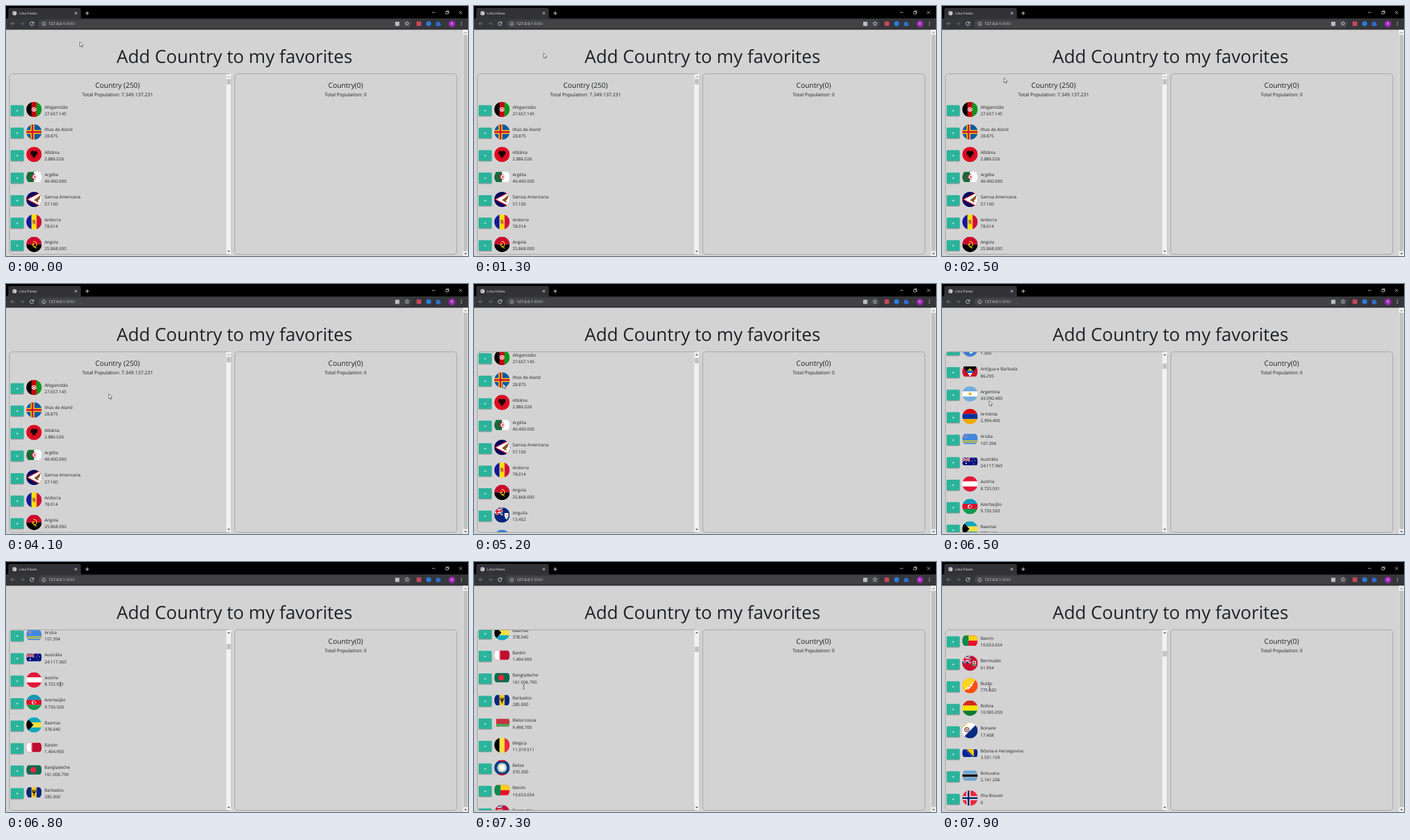
Recreate the animation shown at these times as an HTML page. Size 704x382 px, loop 8000 ms.

```html
<!DOCTYPE html>
<html lang="pt">
<head>
<meta charset="utf-8">
<title>Lista Países</title>
<style>
html, body { margin: 0; width: 100%; height: 100%; overflow: hidden; background: #d3d3d3; }
svg { display: block; width: 100%; height: 100%; }
text { font-family: "Open Sans", "Noto Sans", sans-serif; fill: #1f2124; text-rendering: geometricPrecision; white-space: pre; }
.mid { text-anchor: middle; }
</style>
</head>
<body>
<svg id="stage" viewBox="0 0 704 382" preserveAspectRatio="none"></svg>
<script>
const rect = (x, y, w, h, fill, rx = 0) => `<rect x="${x}" y="${y}" width="${w}" height="${h}" fill="${fill}" rx="${rx}"/>`;
const disc = (x, y, r, fill) => `<circle cx="${x}" cy="${y}" r="${r}" fill="${fill}"/>`;
const ring = (x, y, r, color, w) => `<circle cx="${x}" cy="${y}" r="${r}" fill="none" stroke="${color}" stroke-width="${w}"/>`;
const shape = (d, fill) => `<path d="${d}" fill="${fill}"/>`;
const line = (d, color, w = 1) => `<path d="${d}" fill="none" stroke="${color}" stroke-width="${w}"/>`;
const label = (x, y, size, str, extra = '') => `<text x="${x}" y="${y}" font-size="${size}" ${extra}>${str}</text>`;

function star(x, y, r, fill) {
  let d = '';
  for (let i = 0; i < 10; i++) {
    const a = i * Math.PI / 5, q = i % 2 ? r * .42 : r;
    d += `${i ? 'L' : 'M'}${(x + q * Math.sin(a)).toFixed(2)} ${(y - q * Math.cos(a)).toFixed(2)}`;
  }
  return shape(d + 'Z', fill);
}

// Flags live in a 24 x 24 box clipped to a circle; wide ones fill only a band.
const bars = (...c) => c.map((f, i) => rect(i * 24 / c.length, 0, 24 / c.length + .1, 24, f)).join('');
const bands = (...c) => c.map((f, i) => rect(0, i * 24 / c.length, 24, 24 / c.length + .05, f)).join('');
const band = (h, f) => rect(0, 12 - h / 2, 24, h, f);
const cross = (x, w, f) => rect(x - w / 2, 0, w, 24, f) + rect(0, 12 - w / 2, 24, w, f);
function jack(x, y, w, h) {
  const diag = `M${x} ${y}l${w} ${h}M${x + w} ${y}l${-w} ${h}`;
  const plus = `M${x + w / 2} ${y}v${h}M${x} ${y + h / 2}h${w}`;
  return rect(x, y, w, h, '#00247d') + line(diag, '#fff', h * .2) + line(diag, '#cf142b', h * .08)
    + line(plus, '#fff', h * .32) + line(plus, '#cf142b', h * .18);
}
const crescent = (x, y, r, fill, bg) => disc(x, y, r, fill) + disc(x + r * .3, y, r * .8, bg);

const countries = [
  ['Afeganistão', '27.657.145', bars('#000', '#c4000d', '#009a1c') + ring(12, 12, 3, '#fff', 1.1) + rect(10.7, 10.8, 2.6, 2.6, '#fff')],
  ['Ilhas de Aland', '28.875', rect(0, 0, 24, 24, '#0a58a6') + cross(9.6, 6, '#ffce00') + cross(9.6, 2.8, '#d21034')],
  ['Albânia', '2.886.026', rect(0, 0, 24, 24, '#dc0d22') + shape('M12 8L10 5.5 8.8 7 6.5 7.2 7 13 9.8 12.5 8.5 16 10.7 15.3 12 18.5 13.3 15.3 15.5 16 14.2 12.5 17 13 17.5 7.2 15.2 7 14 5.5Z', '#140306')],
  ['Argélia', '40.400.000', band(16, '#fff') + rect(0, 4, 12, 16, '#146b37') + crescent(11.8, 12, 4, '#d21034', '#e8ece8') + star(13.2, 12, 2, '#d21034')],
  ['Samoa Americana', '57.100', rect(0, 0, 24, 24, '#00065f') + shape('M0 12L24-1V25Z', '#bd1021') + shape('M2.5 12L24 1V23Z', '#fff') + shape('M12 13L17 9 22 5 21 11 18 14 20 17 15 15Z', '#8a5423')],
  ['Andorra', '78.014', bars('#1018a8', '#fedf00', '#d0103a') + rect(9.4, 8.5, 5.2, 7, '#c69a3c', 1.5) + rect(10.4, 9.5, 1.5, 2, '#d0103a') + rect(12, 12, 1.5, 2, '#d0103a')],
  ['Angola', '25.868.000', bands('#cc092f', '#000') + line('M11 7.5C18 7 18 16 11 16M8.5 12L16 18', '#ffcb00', 1.2) + star(11, 11.3, 2, '#ffcb00')],
  ['Anguila', '13.452', rect(0, 0, 24, 24, '#07267d') + jack(-5, 0, 18, 12) + shape('M16 9H22V14Q21 18 19 19 17 18 16 14Z', '#fff') + line('M17.5 12.5h3', '#f08b1d', 1.3) + rect(17, 15, 4, 1.5, '#78bdd4')],
  ['Antárctida', '1.000', rect(0, 0, 24, 24, '#3c7ed0') + shape('M5 6L7 9 9 6 14 5 18 7 20 12 19 16 15 18 13 20 11 17 7 16 6 12 4 9Z', '#fff')],
  ['Antígua e Barbuda', '86.295', band(16, '#ce1126') + shape('M1 4H23L12 20Z', '#000') + star(12, 10.5, 4.6, '#fcd116') + shape('M5.5 10.5H18.5L15.8 14.5H8.2Z', '#0072c6') + shape('M8.2 14.5H15.8L12 20Z', '#fff')],
  ['Argentina', '43.590.400', bands('#74acdf', '#fff', '#74acdf') + disc(12, 12, 2.3, '#f6b40e')],
  ['Arménia', '2.994.400', bands('#d90012', '#0033a0', '#f2a800')],
  ['Aruba', '107.394', band(16, '#4189dd') + rect(0, 14.3, 24, 1.2, '#f9d616') + rect(0, 16.7, 24, 1.2, '#f9d616') + star(5.5, 7.8, 2.6, '#fff') + star(5.5, 7.8, 1.9, '#d21034')],
  ['Austrália', '24.117.360', band(12, '#06107c') + jack(0, 6, 12, 6) + star(6, 15, 1.7, '#fff') + [[18, 8], [15.6, 11.5], [20.3, 10.8], [18, 16]].map(p => star(...p, 1, '#fff')).join('')],
  ['áustria', '8.725.931', bands('#e4173a', '#fff', '#e4173a')],
  ['Azerbaijão', '9.730.500', bands('#1199b8', '#dc102e', '#0f9a4c') + crescent(11.4, 12, 2.9, '#fff', '#dc102e') + star(14.2, 12, 1.5, '#fff')],
  ['Baamas', '378.040', bands('#12a8be', '#fae042', '#12a8be') + shape('M0 0L11 12 0 24Z', '#000')],
  ['Barém', '1.404.900', band(14.4, '#c20b2d') + shape('M0 4.8H7l3 1.44-3 1.44 3 1.44-3 1.44 3 1.44-3 1.44 3 1.44-3 1.44 3 1.44-3 1.44H0Z', '#fff')],
  ['Bangladeche', '161.006.790', band(14.4, '#046a4e') + disc(10.8, 12, 4.7, '#e52a3f')],
  ['Barbados', '285.000', bars('#00267f', '#ffc726', '#00267f') + line('M12 17V8M9.4 8.2Q9.6 13 12 13 14.4 13 14.6 8.2', '#000', 1.2), 16],
  ['Bielorrússia', '9.498.700', band(12, '#c8313e') + rect(0, 14, 24, 4, '#4aa657') + rect(0, 6, 2.8, 12, '#f0d8d8')],
  ['Bélgica', '11.319.511', bars('#000', '#fae042', '#ed2939')],
  ['Belize', '370.300', rect(0, 0, 24, 24, '#003f87') + rect(0, 0, 24, 2.4, '#ce1126') + rect(0, 21.6, 24, 2.4, '#ce1126') + disc(12, 12, 7.5, '#fff') + ring(12, 12, 6, '#5a8a3c', 1)],
  ['Benim', '10.653.654', band(16, '#e8112d') + rect(0, 4, 24, 8, '#fcd116') + rect(0, 4, 9.6, 16, '#08894f')],
  ['Bermudas', '61.954', rect(0, 0, 24, 24, '#c8102e') + jack(-5, 0, 18, 12) + rect(16, 8.5, 5.5, 7.5, '#e9e4e4', 1) + rect(16.5, 13, 4.5, 2.5, '#37883c') + disc(18.7, 11, 1.6, '#b33')],
  ['Butão', '775.620', rect(0, 0, 24, 24, '#ff4e12') + shape('M0 0H24L0 24Z', '#ffd520') + line('M6 18Q7 14 10 15 12 16 13 12 14 8 18 7M8.5 17.5L11 15M13 12L16 11.5', '#fff', 1.8)],
  ['Bolívia', '10.985.059', bands('#d52b1e', '#f9e300', '#0a7a32')],
  ['Bonaire', '17.408', rect(0, 0, 24, 24, '#fff') + shape('M24 0V24H0Z', '#072b7d') + shape('M0 0H9L0 9Z', '#f9d90f') + ring(7, 10.5, 3.5, '#111', 1) + star(7, 10.5, 2.4, '#dc171d')],
  ['Bósnia e Herzegovina', '3.531.159', band(12, '#002395') + shape('M6.5 6H18V17.5Z', '#fecb00') + [0, 1, 2, 3, 4].map(i => star(4.8 + i * 2.6, 7 + i * 2.6, .9, '#fff')).join('')],
  ['Botsuana', '2.141.206', band(16, '#6da5d3') + rect(0, 9.3, 24, 5.4, '#fff') + rect(0, 10, 24, 4, '#000')],
  ['Ilha Bouvet', '0', rect(0, 0, 24, 24, '#e92a3c') + cross(9.6, 6, '#fff') + cross(9.6, 3, '#002868')],
];

const ROW = 34.37;
const row = ([name, people, flag, height = 24], i) => `<g transform="translate(0 ${i * ROW - .4})">
  ${rect(7, 152.8, 20.3, 16.8, 'rgba(0,0,0,.15)', 1.6)}${rect(7.2, 152.6, 20, 16.2, 'rgba(0,0,0,.18)', 1.5)}
  ${rect(7, 151.9, 20, 16.2, '#2bb39b', 1.2)}${line('M15.6 160.3h2.8M17 158.9v2.8', '#fff', .7)}
  <g transform="translate(31 146.8) scale(.975)" clip-path="url(#round)"><g ${height < 24 ? 'clip-path="url(#wide)"' : ''}>${flag}</g></g>
  ${label(58.7, 157.2, 6.5, name)}${label(58.7, 167.5, 6.5, people)}</g>`;

const arrow = (x, y, up, color) => shape(`M${x - 2} ${y + (up ? 1 : -1)}h4l-2 ${up ? -2.3 : 2.3}Z`, color);

const browser = rect(0, 0, 704, 19.5, '#000') + shape('M1 19.5Q3.5 19 3.5 16V6Q3.5 3 6.5 3H111Q114 3 114 6V16Q114 19 116.5 19.5Z', '#323236')
  + rect(0, 19, 704, 17.3, '#35363a') + rect(49, 21, 569, 12.6, '#434346', 6.3)
  + disc(13, 11, 3.2, '#d5d7da') + line('M10.5 10l2 1 .5 2M13 8.3l1.7 1.2', '#55585c', .9)
  + label(20, 12.8, 5.1, 'Lista Países', 'style="fill:#f0f1f3"')
  + line('M104.6 9.2l3.6 3.6m0-3.6l-3.6 3.6M121 11h5.6m-2.8-2.8v5.6', '#e8eaed', .9)
  + line('M649 9.8h5M690.3 7.5l4.6 4.6m0-4.6l-4.6 4.6M670 8.5h3.6v3.6H670ZM671.2 8.2V7.3h3.6v3.7h-.9', '#e4e4e4', .7)
  + line('M13.3 27H7.7m2.6-2.7L7.6 27l2.7 2.7', '#85878b', .9) + line('M22 27h5.6M25 24.3l2.7 2.7-2.7 2.7', '#6c6e72', .9)
  + line('M41.7 25.2a2.8 2.8 0 1 0 .5 2.6M42.2 24v2.2H40', '#e8eaed', .9)
  + ring(57.6, 27.2, 2.7, '#d5d7da', .7) + line('M57.6 26.9v1.7M57.6 25.5v.7', '#d5d7da', .7)
  + label(65, 29.1, 5.9, '<tspan fill="#f4f5f6">127.0.0.1</tspan><tspan fill="#a9adb3">:8080</tspan>')
  + rect(593, 24, 6.5, 6.5, '#b9bcc1', .7) + `<g fill-opacity="0" stroke="#d5d7da" stroke-width=".7">${star(611, 27, 3.4, '#fff')}</g>`
  + rect(625.6, 23.6, 7, 7, '#c9475a', .6) + disc(644, 27, 3.8, '#2b7de0')
  + shape('M655.3 25h2a1.2 1.2 0 1 1 2.2 0h1.7v2a1.2 1.2 0 1 1 0 2.2v1.5h-5.9Z', '#2f6fd0')
  + line('M669.3 23.5v7.5', '#55575b', .6) + disc(679.5, 27.2, 5.2, '#9c27b0') + label(679.5, 29.2, 5.4, 'R', 'class="mid" style="fill:#fff"')
  + [24.6, 27, 29.4].map(y => disc(694, y, .7, '#e0e2e5')).join('');

const page = rect(696.3, 36.3, 7.7, 346, '#f1f1f1') + rect(697, 44, 6.3, 330.5, '#c1c1c1')
  + arrow(700.2, 40.6, true, '#888') + arrow(700.2, 378.6, false, '#505050')
  + label(348.2, 87.2, 27.5, 'Add Country to my favorites', 'class="mid"')
  + label(517.5, 124.7, 10.8, 'Country(0)', 'class="mid"') + label(517.5, 138, 7.4, 'Total Population: 0', 'class="mid"');

const frame = (x, w) => `<rect x="${x}" y="103.7" width="${w}" height="275.8" rx="4.5" fill="none" stroke="#999" stroke-width=".8"/>`;

document.getElementById('stage').innerHTML = `
  <defs><clipPath id="round">${disc(12, 12, 12, '#000')}</clipPath><clipPath id="wide">${band(16, '#000')}</clipPath>
  <clipPath id="panel">${rect(5, 103.7, 338.5, 275.8, '#000', 4.5)}</clipPath></defs>
  ${rect(0, 0, 704, 382, '#d3d3d3')}${browser}${page}
  <g clip-path="url(#panel)">
    <g id="list">${label(170, 124.7, 10.8, 'Country (250)', 'class="mid"')}
      ${label(170, 138, 7.4, 'Total Population: 7.349.137.231', 'class="mid"')}${countries.map(row).join('')}</g>
  </g>
  ${frame(5.2, 338.2)}${frame(348.6, 338.4)}
  ${rect(335.6, 104, 7.7, 275.2, '#f1f1f1')}<g id="up">${arrow(339.4, 108, true, 'currentColor')}</g>${arrow(339.4, 375, false, '#505050')}
  <g id="thumb">${rect(336.3, 111.6, 6.2, 8.2, '#c1c1c1')}</g>
  <g id="pointer"><path d="M0 0V7.3L1.7 5.8 2.8 8.3 4 7.8 2.9 5.4H5.2Z" fill="#fff" stroke="#222" stroke-width=".6"/></g>
  <g id="caret">${line('M-1.3-3.2Q0-3.2 0-2.5V2.5Q0 3.2 1.3 3.2M1.3-3.2Q0-3.2 0-2.5M0 2.5Q0 3.2-1.3 3.2', '#222', .65)}</g>`;

const LOOP = 8000, STEP = 100, TEXT_CURSOR_AT = 6600;
const scrollKeys = [[4800, 0], [4900, 3], [5000, 24], [5100, 41], [5200, 45.8], [5500, 45.8], [6000, 91.7], [6100, 104.7],
  [6200, 150], [6600, 395], [6700, 440], [6800, 459.1], [6900, 459.1], [7000, 474], [7300, 600], [7600, 742], [7800, 825], [7900, 828.4]];
const pointerKeys = [[1000, 112.5, 54.7], [1300, 106, 72], [1700, 96, 109], [2000, 96, 109], [2100, 95.5, 109], [2500, 94.5, 109.8],
  [2700, 94.5, 109.8], [2800, 170, 187], [3100, 170, 187], [4000, 174, 180], [4100, 156.7, 168], [4800, 50, 152],
  [5200, 44, 152], [6100, 39.5, 152], [6600, 80, 185], [6800, 83, 187], [6900, 83, 187], [7400, 74, 192], [7900, 72.5, 192.5]];

function sample(keys, t) {
  const i = keys.findIndex(k => k[0] > t);
  if (i === 0) return keys[0].slice(1);
  if (i < 0) return keys[keys.length - 1].slice(1);
  const a = keys[i - 1], b = keys[i], u = (t - a[0]) / (b[0] - a[0]);
  return a.slice(1).map((v, n) => v + (b[n + 1] - v) * u);
}

const [list, up, thumb, pointer, caret] = ['list', 'up', 'thumb', 'pointer', 'caret'].map(id => document.getElementById(id));
const start = performance.now();

function draw(now) {
  const t = Math.floor((Math.max(0, now - start) % LOOP) / STEP) * STEP;
  const [scroll] = sample(scrollKeys, t);
  const [x, y] = sample(pointerKeys, t);
  const overText = t >= TEXT_CURSOR_AT;
  list.setAttribute('transform', `translate(0 ${-scroll})`);
  thumb.setAttribute('transform', `translate(0 ${scroll * .0296})`);
  up.style.color = scroll ? '#505050' : '#a3a3a3';
  for (const c of [pointer, caret]) c.setAttribute('transform', `translate(${x} ${y})`);
  pointer.style.display = overText ? 'none' : '';
  caret.style.display = overText ? '' : 'none';
  requestAnimationFrame(draw);
}
draw(start);
</script>
</body>
</html>
```
